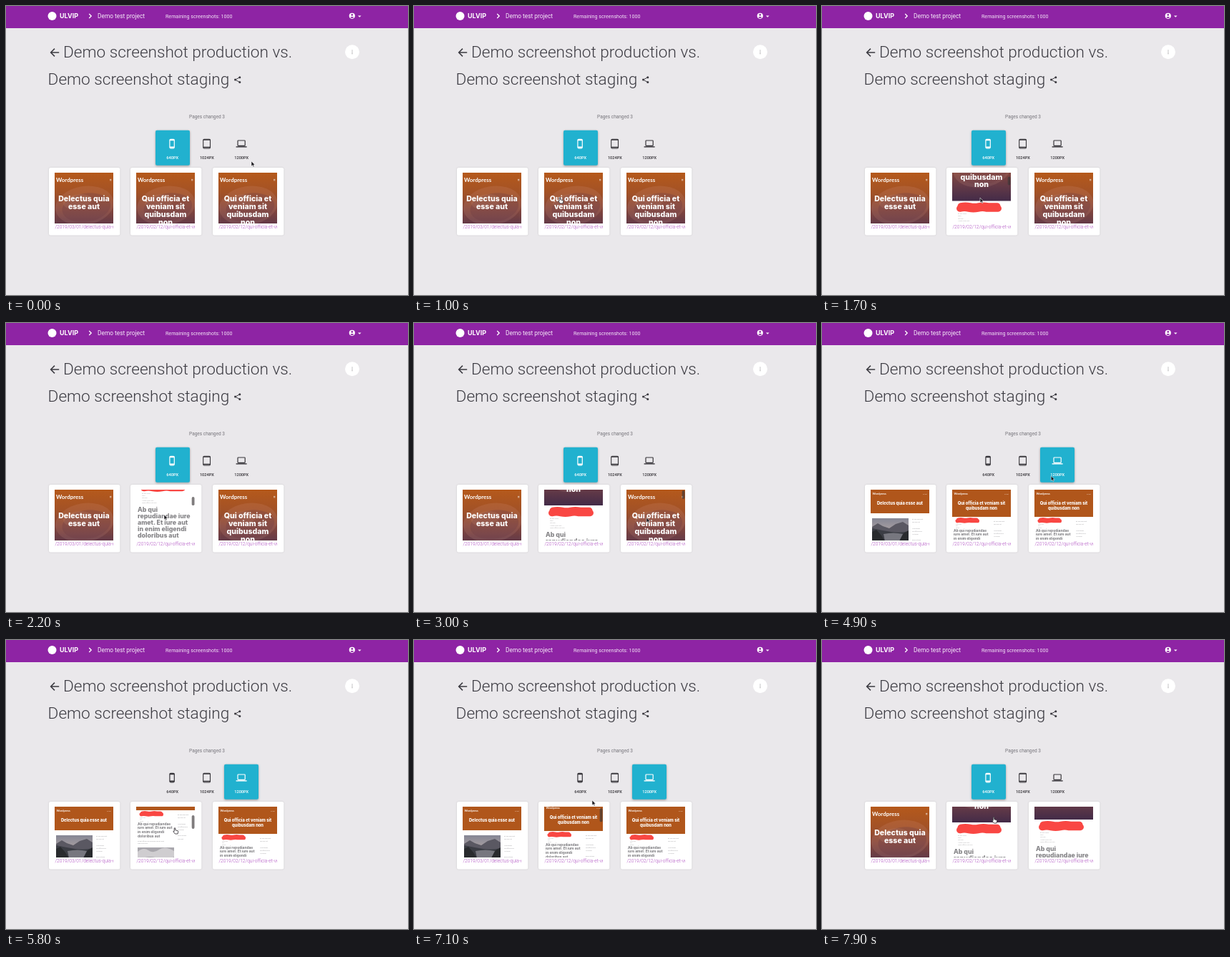
An HTML page for the animation above (8000 ms loop, 562 px wide and 404 px high).

```html
<!DOCTYPE html>
<html lang="en">
<head>
<meta charset="utf-8">
<title>Screenshot comparison</title>
<style>
  html, body { margin: 0; width: 100%; height: 100%; overflow: hidden; background: #eae8eb; }
  #stage { display: block; width: 562px; height: 404px; font-family: Roboto, sans-serif; }
  .bold { font-family: Inter, sans-serif; font-weight: 700; }
  .heavy { font-family: Inter, sans-serif; font-weight: 800; }
  .site { font-family: Lato, sans-serif; font-weight: 700; }
  .light { font-weight: 300; }
  .medium { font-weight: 500; }
  .mid { text-anchor: middle; }
  .tab { color: #37353a; }
  .tab rect.bg { fill: none; }
  .tab.on { color: #fff; }
  .tab.on rect.bg { fill: #21b1cf; filter: drop-shadow(0 1px 1.5px #0005); }
  .card { filter: drop-shadow(0 .5px .8px #0002); }
</style>
</head>
<body>
<svg id="stage" viewBox="0 0 562 404"></svg>
<script>
const LOOP = 8000, STEP = 100;
const stage = document.getElementById('stage');

const text = (x, y, size, str, fill = '#fff', cls = '') =>
  `<text x="${x}" y="${y}" font-size="${size}" fill="${fill}" class="${cls}">${str}</text>`;
const rect = (x, y, w, h, fill, extra = '') =>
  `<rect x="${x}" y="${y}" width="${w}" height="${h}" fill="${fill}" ${extra}/>`;
const path = (d, extra = '') => `<path d="${d}" ${extra}/>`;
const circle = (x, y, r, fill) => `<circle cx="${x}" cy="${y}" r="${r}" fill="${fill}"/>`;
const lines = (x, y, gap, size, list, fill, cls) =>
  list.map((s, i) => text(x, y + i * gap, size, s, fill, cls)).join('');

const defs = `<defs>
  <linearGradient id="hero" x2="0" y2="1">
    <stop offset="0" stop-color="#b5591b"/><stop offset=".3" stop-color="#a35226"/>
    <stop offset=".55" stop-color="#85473c"/><stop offset=".77" stop-color="#643a47"/>
    <stop offset="1" stop-color="#432b48"/>
  </linearGradient>
  <linearGradient id="sky" x2="0" y2="1">
    <stop offset="0" stop-color="#858694"/><stop offset="1" stop-color="#c9b7ae"/>
  </linearGradient>
</defs>`;

const header = `
  ${rect(0, 0, 562, 31, '#8e24a4')}
  ${circle(64.5, 14, 6, '#fff')}
  ${text(75, 17.3, 9, 'ULVIP', '#fff', 'bold')}
  ${path('M116.2 11l3 3-3 3', 'fill="none" stroke="#fff" stroke-width="1.3"')}
  ${text(128, 17.2, 8.35, 'Demo test project', '#f6ebf8')}
  ${text(223, 16.8, 7.1, 'Remaining screenshots: 1000', '#f3e4f6')}
  ${circle(483.8, 13.8, 4.1, '#fff')}${circle(483.8, 12.4, 1.3, '#8e24a4')}
  ${path('M481.2 15.9q2.6-1.9 5.2 0q-2.6 2.3-5.2 0', 'fill="#8e24a4"')}
  ${path('M492 13.4h4.6l-2.3 2.4z', 'fill="#fff"')}`;

const heading = `
  ${path('M74.2 65H62.6M68 59.6l-5.4 5.4 5.4 5.4', 'fill="none" stroke="#3b3a40" stroke-width="1.5"')}
  ${text(80, 72, 22.6, 'Demo screenshot production vs.', '#3c3b42', 'light')}
  ${text(58.6, 110.2, 22.6, 'Demo screenshot staging', '#3c3b42', 'light')}
  ${path('M327 99.6l-6.6 3.5 6.6 3.6', 'fill="none" stroke="#3b3a40" stroke-width="1"')}
  ${circle(326.8, 99.7, 1.5, '#3b3a40')}${circle(320.5, 103.1, 1.5, '#3b3a40')}${circle(326.8, 106.6, 1.5, '#3b3a40')}
  ${circle(484, 64.2, 10, '#fff')}
  ${[62, 64.3, 66.6].map(y => circle(484, y, .6, '#77757a')).join('')}
  ${text(281, 156.8, 6.5, 'Pages changed 3', '#77757b', 'mid')}`;

const icons = [
  rect(228.9, 186.4, 6.4, 12.4, 'none', 'rx="1.2" stroke="currentColor" stroke-width="1.2"') +
    path('M229 187.4h6.2M229 197.3h6.2', 'stroke="currentColor" stroke-width="1.7"'),
  rect(275.7, 186.2, 9.8, 12.8, 'none', 'rx="1.2" stroke="currentColor" stroke-width="1.1"') +
    path('M276 187h9.4M276 197.5h9.4', 'stroke="currentColor" stroke-width="1.5"'),
  rect(324, 188, 10.2, 7.3, 'none', 'rx=".8" stroke="currentColor" stroke-width="1.2"') +
    path('M321.6 196.9h15', 'stroke="currentColor" stroke-width="1.4"')
];
const tabs = ['640PX', '1024PX', '1200PX'].map((label, i) => `<g class="tab">
  <rect class="bg" x="${209 + 48 * i}" y="173.8" width="48" height="49" rx="2"/>
  ${icons[i]}${text(232.6 + 48.3 * i, 214.3, 5.7, label, 'currentColor', 'mid medium')}</g>`).join('');

// Rough painted bar, w by h: two wavy brush strokes
const blob = (x, y, w, h) => {
  const stroke = (dy, inset) => path(
    `M${x + inset + h * .35} ${y + h * dy}q${w * .1}-${h * .1} ${w * .2} 0t${w * .2} 0t${w * .2} 0` +
    `H${x + w - inset - h * .35}`,
    `fill="none" stroke="#f94743" stroke-width="${h * .7}" stroke-linecap="round"`);
  return stroke(.4, 1.5) + stroke(.63, 0);
};

const tiny = ['Et aut quia', 'Non', 'Sit iure', 'Amet enim aut', 'Quia officia sit non'];

const smallHero = title => `
  ${rect(0, 0, 82, 92, 'url(#hero)')}
  <g transform="rotate(-9 42 47)">
    <ellipse cx="42" cy="46" rx="41" ry="27" fill="#d9a595" opacity=".14"/>
    <ellipse cx="44" cy="49" rx="34" ry="20" fill="#6c3a42" opacity=".3"/>
    <ellipse cx="33" cy="39" rx="20" ry="10" fill="#dba184" opacity=".14"/>
  </g>
  ${text(2, 12.8, 7.9, 'Wordpress', '#fff', 'site')}
  ${path('M77 9.4h2.4M77 10.8h2.4', 'stroke="#fff" stroke-width=".6"')}
  ${lines(41, 40.2, 10.9, 10.6, title, '#fff', 'heavy mid')}`;

const smallPage = title => smallHero(title) + blob(6, 94, 63, 13.5) +
  lines(8, 110.5, 3.4, 2.5, tiny, '#aaa8aa') +
  lines(2, 136, 9, 8.8,
    ['Ab qui', 'repudiandae iure', 'amet. Et iure aut', 'in enim eligendi', 'doloribus aut'], '#858487', 'heavy');

const wideHero = (h, title) => `
  ${rect(0, 0, 82, h, '#b0561b')}
  ${text(2.5, 7.2, 4, 'Wordpress', '#fff', 'site')}
  ${text(73, 6.6, 2, 'Sit aut', '#f0d8c6')}
  ${lines(41, 21.2, 6.8, 5.75, title, '#fff', 'heavy mid')}`;

const sidebar = y => lines(58, y, 4.2, 2.3,
  ['Et iure quia aut', 'Qui non sit', '', 'Amet enim', 'Sit officia non', 'Aut quia', '', 'Enim et iure', 'Non aut'], '#99989c');

const landscape = (x, y) => `<g transform="translate(${x} ${y})">
  ${rect(0, 0, 51, 32, 'url(#sky)')}
  ${path('M0 12l8-5 7 4 9 3 9-6 10-3 8 5v11H0z', 'fill="#5a5862"')}
  ${path('M0 14q14 3 27 5t24-1v14H0z', 'fill="#3b3d44"')}
  ${path('M16 22q14-3 27 0l-5 10H18z', 'fill="#77777f"')}
  ${path('M0 19l6-3 7 8 5 8H0zM51 17l-7 4-6 11h13z', 'fill="#292b2e"')}</g>`;

const clouds = `<g transform="translate(2 90)">
  ${rect(0, 0, 51, 34, '#a9a7ad')}
  ${path('M0 6q8-7 15-2t15-1 21 2v8q-13 7-24 2t-27 3z', 'fill="#cfcdd0"')}
  ${path('M0 23q17-9 29-3t22-2v16H0z', 'fill="#8d8c93"')}</g>`;

const widePage = `${wideHero(38, ['Qui officia et veniam sit', 'quibusdam non'])}
  ${blob(4.5, 39, 33.5, 7.5)}${lines(5, 49.2, 2.2, 1.7, tiny.slice(0, 3), '#aaa8aa')}${sidebar(45)}
  ${lines(2, 58.6, 5.8, 4.8, ['Ab qui repudiandae', 'iure amet. Et iure aut', 'in enim eligendi', 'doloribus aut'], '#858488', 'heavy')}
  ${lines(2, 82, 3, 2.1, ['Sit aut officia non quia enim iure et amet', 'Quia et non aut'], '#99989c')}${clouds}`;

const food = ['Qui officia et', 'veniam sit', 'quibusdam', 'non'];
const cards = [
  { x: 60, url: '/2019/03/01/delectus-quia-esse-aut',
    small: smallHero(['Delectus quia', 'esse aut']),
    wide: wideHero(33, ['Delectus quia esse aut']) + landscape(2, 40) + sidebar(42) },
  { x: 174, url: '/2019/02/12/qui-officia-et-veniam', small: smallPage(food), wide: widePage },
  { x: 289, url: '/2019/02/12/qui-officia-et-veniam', small: smallPage(food), wide: widePage }
].map(c => `${rect(c.x, 226, 99.3, 94.5, '#fff', 'rx="2.5" class="card"')}
  <svg x="${c.x + 8}" y="233" width="82" height="71">
    <g class="small">${c.small}</g><g class="wide">${c.wide}</g>
    <rect class="bar" x="77.7" width="3.8" rx="1.9" fill="#3a3538" opacity=".65"/>
  </svg>
  <svg x="${c.x + 8}" y="304" width="82" height="10">${text(.4, 6.8, 6.6, c.url, '#ad4bc0', 'light')}</svg>`).join('');

const cursor = `<g id="cursor">
  ${path('M0 0v7l1.7-1.5 1.1 2.4 1.2-.6-1.1-2.3H5z', 'id="arrow" fill="#1d1b20" stroke="#fff" stroke-width=".5"')}
  ${path('M-.8 0Q0-.8.8 0v2.8l3.2.8q.9.3.7 1.5L4 8H.3L-2.2 4.8q0-1 1.4-.3z', 'id="hand" fill="#fff" stroke="#262329" stroke-width=".8"')}</g>`;

stage.innerHTML = defs + header + heading + tabs + cards + cursor;

// Tables of [time, ...values]
const pointer = [
  [0, 343, 217], [300, 340, 217], [900, 204, 268], [1300, 204, 268], [1600, 221, 268], [2700, 221, 268],
  [3000, 325, 272], [3500, 325, 272], [3900, 330, 208], [4800, 330, 208], [5300, 236, 263],
  [6700, 236, 263], [7100, 249, 224], [7300, 233, 202], [7500, 233, 202], [7900, 240, 248], [8000, 240, 248]
];
const scrolls = {
  small: [[[0, 0]],
    [[0, 0], [1300, 0], [2100, 105], [2300, 105], [2700, 70]],
    [[0, 0], [3000, 0], [3400, 74]]],
  wide: [[[0, 0]],
    [[0, 0], [5300, 0], [5700, 33], [6100, 33], [6700, 4]],
    [[0, 0]]]
};
const barTimes = { small: [1300, 2800], wide: [5300, 7300] };
const handTimes = [[800, 1400], [5100, 6900], [7700, 8000]];
const within = (t, [a, b]) => t >= a && t < b;

function at(table, t) {
  const i = table.findIndex(k => k[0] > t);
  if (i < 0) return table[table.length - 1].slice(1);
  const a = table[i - 1], b = table[i];
  const p = (t - a[0]) / (b[0] - a[0]), e = p * p * (3 - 2 * p);
  return a.slice(1).map((v, j) => v + (b[j + 1] - v) * e);
}

const all = s => [...stage.querySelectorAll(s)];
const tabEls = all('.tab'), bars = all('.bar');
const pages = { small: all('.small'), wide: all('.wide') };
const show = (el, on) => el.setAttribute('display', on ? 'inline' : 'none');
const [pointerEl, arrow, hand] = ['cursor', 'arrow', 'hand'].map(id => document.getElementById(id));

function draw(t) {
  const wide = within(t, [4700, 7500]), mode = wide ? 'wide' : 'small';
  tabEls.forEach((el, i) => el.classList.toggle('on', i === (wide ? 2 : 0)));
  for (const m in pages) pages[m].forEach((el, i) => {
    show(el, m === mode);
    el.setAttribute('transform', `translate(0 ${-at(scrolls[m][i], t)[0]})`);
  });
  bars.forEach((el, i) => {
    const y = at(scrolls[mode][i], t)[0];
    show(el, i === 1 ? within(t, barTimes[mode]) : i === 2 && within(t, [3000, 3600]));
    el.setAttribute('y', 1 + y * (wide ? .33 : .086));
    el.setAttribute('height', wide ? 19 : 12);
  });
  const isHand = handTimes.some(r => within(t, r));
  show(hand, isHand);
  show(arrow, !isHand);
  pointerEl.setAttribute('transform', `translate(${at(pointer, t).join(' ')})`);
}

const start = performance.now();
function tick() {
  const t = (performance.now() - start) % LOOP;
  draw(Math.floor(t / STEP) * STEP);
  requestAnimationFrame(tick);
}
draw(0);
requestAnimationFrame(tick);
</script>
</body>
</html>
```
